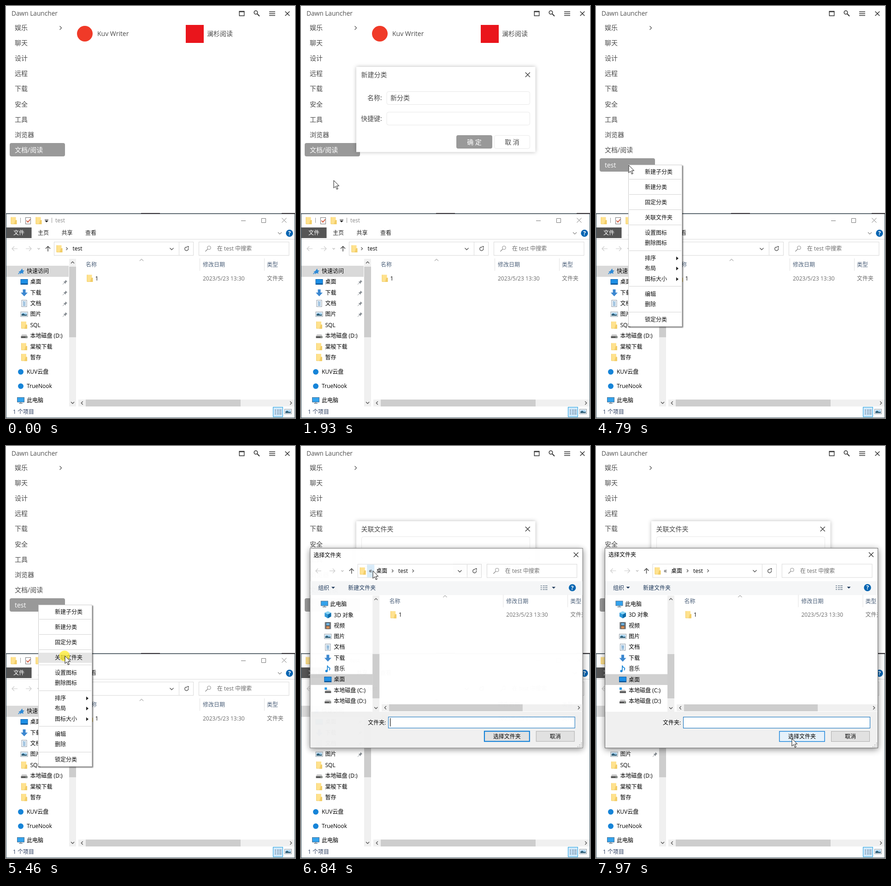
An HTML page that plays this animation: 627x893 px, repeating every 8 s.

```html
<!DOCTYPE html>
<html lang="zh-CN">
<head>
<meta charset="utf-8">
<title>Dawn Launcher</title>
<style>
  html, body { margin: 0; width: 100%; height: 100%; overflow: hidden; background: #fff; }
  svg { display: block; }
  text { font-family: "Open Sans", "Noto Sans CJK SC", "Noto Sans CJK", sans-serif; white-space: pre; }
  .modal { filter: drop-shadow(0 0 4px #0004); }
  .menu { filter: drop-shadow(2px 2px 1px #0008); }
  .window { filter: drop-shadow(0 3px 7px #0007); transform-origin: 315px 438px; }
</style>
</head>
<body>
<svg id="stage" width="100%" height="100%" viewBox="0 0 627 893"></svg>
<script>
const LOOP = 8000;
const stage = document.getElementById('stage');

// y is the vertical middle of the line of text
const text = (x, y, s, fill = '#000', size = 12, attrs = '') =>
  `<text x="${x}" y="${y + size * .37}" font-size="${size}" fill="${fill}" ${attrs}>${s}</text>`;
const label = (x, y, s, attrs = '') => text(x, y, s, '#4a4a4a', 14, attrs);
const middle = 'text-anchor="middle"';
const rect = (x, y, w, h, fill, attrs = '') =>
  `<rect x="${x}" y="${y}" width="${w}" height="${h}" fill="${fill}" ${attrs}/>`;
const box = (x, y, w, h, stroke, fill = '#fff', rx = 0) =>
  rect(x, y, w, h, fill, `stroke="${stroke}" rx="${rx}"`);
const line = (d, stroke = '#444', width = 1, fill = 'none') =>
  `<path d="${d}" fill="${fill}" stroke="${stroke}" stroke-width="${width}"/>`;
const shape = (d, fill) => `<path d="${d}" fill="${fill}"/>`;
const dot = (x, y, r, fill) => `<circle cx="${x}" cy="${y}" r="${r}" fill="${fill}"/>`;
const at = (x, y, s) => `<g transform="translate(${x} ${y})">${s}</g>`;
const group = (id, s, attrs = '') => `<g id="${id}" ${attrs}>${s}</g>`;

const cross = (x, y, r = 5, c = '#444', w = 1.5) =>
  line(`M${x - r} ${y - r}l${2 * r} ${2 * r}m0 ${-2 * r}l${-2 * r} ${2 * r}`, c, w);
const down = (x, y, r = 4, c = '#555', w = 1.4) => line(`M${x - r} ${y - r / 2}l${r} ${r}l${r} ${-r}`, c, w);
const up = (x, y, r = 3.5, c = '#555', w = 1.4) => line(`M${x - r} ${y + r / 2}l${r} ${-r}l${r} ${r}`, c, w);
const right = (x, y, r = 3, c = '#555', w = 1.3) => line(`M${x - r / 2} ${y - r}l${r} ${r}l${-r} ${r}`, c, w);
const left = (x, y, r = 3.5, c = '#555', w = 1.4) => line(`M${x + r / 2} ${y - r}l${-r} ${r}l${r} ${r}`, c, w);
const triangle = (x, y, c = '#222') => shape(`M${x - 4} ${y - 2}h8l-4 4z`, c);
const help = (x, y) => dot(x, y, 7.7, '#0063b1') + text(x, y, '?', '#fff', 12, middle + ' font-weight="700"');

// Small icons, each centred on its own origin
const icons = {
  folder: rect(-6.5, -7.5, 11, 15, '#ffe28e') + shape('M3-1h3.5v9h-6z', '#f2cd67') +
    line('M-6-7.5v15h12', '#efc85c', .8),
  desktop: box(-7.5, -5.5, 15, 11, '#0a5fa8', '#1d8fe6') + rect(-7, 3.5, 14, 2, '#0b4f8e'),
  download: shape('M-3-7h6v7h4.5l-7.5 8-7.5-8h4.5z', '#3b87d0'),
  doc: box(-5.5, -7, 11, 14, '#8796a5') + line('M-3-4h3m1 0h2M-3-1.3h6M-3 1.4h6M-3 4.1h6', '#3b82bd', 1.3),
  picture: box(-7.5, -5, 15, 10, '#8d99a3') + rect(-5.8, -3.3, 11.6, 6.6, '#a8d4f2') +
    shape('M-5.8 3.3v-3l4-2 4 3 3.6-1v3z', '#2d5d76'),
  disk: shape('M-5-3h10l2 4h-14z', '#c9c9c9') + rect(-7, 1, 14, 4, '#555') + rect(3, 2.4, 3, 1.2, '#d5e8d5'),
  system: rect(-7, -6, 5, 5, '#1996e6') + shape('M-4-1h9l2 3h-13z', '#c9c9c9') + rect(-6.5, 2, 13.5, 4, '#555'),
  pc: box(-7.5, -6.5, 15, 10, '#4a6f8e', '#33a3ee') + line('M-4 6.2h8M0 3.5v3', '#6d7f8e', 1.4),
  cube: shape('M0-7.5l7 3v8l-7 4-7-4v-8z', '#2d97d8') + shape('M0-1l7-3.5v8l-7 4z', '#0d6aa8') +
    shape('M0-7.5l7 3-7 3.5-7-3.5z', '#8bd6f5'),
  video: rect(-6.5, -7.5, 13, 15, '#3a3f45') + rect(-3.5, -6, 7, 5.5, '#6fb1dd') + rect(-3.5, 1, 7, 5.5, '#d78d55') +
    line('M-5-6.5v14M5-6.5v14', '#fff', 1.2).replace('/>', ' stroke-dasharray="1.5 1.5"/>'),
  music: line('M-1 5v-12q1 4 5 5.5q1 2-1 5', '#1e88d8', 1.8) + dot(-3, 5, 2.6, '#1e88d8'),
  cloud: dot(0, 0, 6, '#1684d8'),
  star: shape('M2-6l1.2 4 3.8.6-3 2.8.8 4.2-3.8-1.8-4 2.8.8-4-3.8-1.6 4-1.4z', '#2d89d6') + line('M-6.5 6l4-4', '#2d89d6', 1.4),
  pin: shape('M1-5l4 4-1.5.6-2 2 0 2.4-5-5 2.4 0 2-2z', '#868c92') + line('M-1.5 1.5l-3.5 3.5', '#868c92'),
  details: line('M-8-4h3m2 0h4m1 0h5M-8 0h3m2 0h4m1 0h5M-8 4h3m2 0h4m1 0h5', '#6c7f90', 1.5),
  magnifier: `<circle cx="2" cy="-2" r="3.8" fill="none" stroke="#888"/>` + line('M-1 1l-5 5', '#888', 1.3),
  refresh: line('M1.5-3.2a3.9 3.9 0 1 0 2.2 2', '#555', 1.4) + shape('M1-5.6h4v4z', '#555')
};
const icon = (name, x, y) => at(x, y, icons[name]);

const row = (x, y, name, s) => icon(name, x - 13, y) + text(x, y, s);
const vbar = (x, y, h, ty, th) => rect(x, y, 15, h, '#f0f0f0') + rect(x, ty, 15, th, '#cdcdcd') +
  up(x + 7.5, y + 8) + down(x + 7.5, y + h - 8, 3.5);
const hbar = (x, y, w, tx, tw) => rect(x, y, w, 15, '#f0f0f0') + rect(tx, y, tw, 15, '#cdcdcd') +
  left(x + 8, y + 7.5) + right(x + w - 8, y + 7.5, 3.5, '#555', 1.4);

const addressBar = (x, y, end) =>
  line(`M${x + 6} ${y}h-12m5-5l-5 5l5 5M${x + 24} ${y}h12m-5-5l5 5l-5 5`, '#ccc', 1.2) +
  down(x + 52, y, 2.5, '#bbb') +
  line(`M${x + 72} ${y + 6}v-11m-5 5l5-5l5 5`, '#555', 1.6) +
  box(x + 85.5, y - 14.5, end - x - 85.5, 29, '#d9d9d9') +
  line(`M${end - 31} ${y - 14}v28`, '#d9d9d9') +
  down(end - 47, y + .5) + icon('refresh', end - 15, y) +
  box(end + 12, y - 14.5, 195.5, 29, '#d9d9d9') +
  icon('magnifier', end + 32, y) + text(end + 51.5, y, '在 test 中搜索', '#6a6a6a');

const fileList = text(173, 561, '名称', '#4c607a') + up(294, 550.5, 4, '#777', 1) +
  line('M420.5 547v27M560.5 547v27', '#e2e2e2') +
  text(427, 561, '修改日期', '#4c607a') + text(566, 561, '类型', '#4c607a') +
  icon('folder', 182, 590) + text(193.5, 590.5, '1') +
  text(427, 590.5, '2023/5/23 13:30', '#6d6d6d') + text(566, 590.5, '文件夹', '#6d6d6d');

// Launcher
const categories = ['娱乐', '聊天', '设计', '远程', '下载', '安全', '工具', '浏览器', '文档/阅读', 'test'];
const categoryY = i => Math.round(47 + 33.1 * i);
const launcher = text(12, 16, 'Dawn Launcher', '#505050', 13.7) +
  line('M506.3 12.3h10.4v9h-10.4z', '#333', 1.4) + line('M505.6 12h11.8', '#333', 2.6) +
  `<circle cx="542" cy="14" r="3.7" fill="none" stroke="#333" stroke-width="1.6"/>` + line('M545 17l5 5', '#333', 2) +
  line('M571 12.5h13M571 16.5h13M571 20.5h13', '#333', 1.4) + cross(610.5, 16.5, 4.8, '#333') +
  right(118.5, 47.5, 4, '#555') +
  rect(8, 297, 120, 29, '#999', 'id="selected" rx="4"') +
  categories.map((s, i) => label(19, categoryY(i), s, `id="category${i}"`)).join('') +
  group('apps', dot(171, 60, 17, '#f03a28') + label(198, 60, 'Kuv Writer') +
    rect(390, 41, 39, 39, '#ea151c') + label(436, 60, '澜杉阅读'));

// Explorer window
const places = [['desktop', '桌面'], ['download', '下载'], ['doc', '文档'], ['picture', '图片'],
  ['folder', 'SQL'], ['disk', '本地磁盘 (D:)'], ['folder', '棠梭下载'], ['folder', '暂存']];
const explorer = box(.5, 450.5, 626, 442, '#465d69') + line('M0 450h627', '#48545c', 1.5) +
  line('M293 449.5h41M598 449.5h29', '#2a2024', 1.5) +
  icon('folder', 17, 465) + line('M31.5 459v11M99.5 459v11', '#999') +
  box(42.5, 458.5, 11, 14, '#777') + line('M44.5 465l3 3.5 5-6', '#d24726', 1.7) +
  icon('folder', 71, 465) + line('M84 463h8', '#222') + triangle(88, 467) + text(107, 465, 'test', '#888') +
  line('M510 465.5h10M554.5 460.5h9v9h-9z', '#777') + cross(603.5, 464.5, 5, '#777', 1) +
  rect(1, 480, 54.5, 23, '#555') + text(16, 492, '文件', '#fff') +
  ['主页', '共享', '查看'].map((s, i) => text(69 + 51.5 * i, 492, s, '#222')).join('') +
  line('M1 505.5h625', '#dadada') + down(594, 492.5, 4, '#888', 1.1) + help(615, 492.5) +
  addressBar(19, 526, 406.5) + icon('folder', 116, 526) + right(132, 526) + text(144.5, 526, 'test') +
  fileList +
  rect(1, 563, 135, 24, '#d9d9d9') + icon('star', 33, 575) + text(45, 575, '快速访问') +
  places.map(([name, s], i) => row(52.5, 598 + 23.35 * i, name, s) +
    (i < 4 ? icon('pin', 128, 598.5 + 23.35 * i) : '')).join('') +
  row(45, 793, 'cloud', 'KUV云盘') + row(45, 824, 'cloud', 'TrueNook') + row(45, 855, 'pc', '此电脑') +
  vbar(137, 548, 320, 565, 153) + hbar(157, 853, 469, 173, 336) +
  text(15, 880, '1 个项目', '#26395c') +
  box(579.5, 869.5, 21, 21, '#26a0da', '#cce8ff') + at(591, 880, icons.details) + icon('picture', 612, 879);

// Launcher dialogs
const field = (x, y, w, h) => box(x, y, w, h, '#e8e8e8', '#fff', 4);
const confirm = (x, y) => rect(x, y, 78, 29, '#999', 'rx="4"') +
  text(x + 39, y + 14.5, '确 定', '#fff', 14, middle + ' font-weight="500"');
const cancel = y => field(419.5, y + .5, 77, 28.5) + label(458, y + 14.5, '取 消', middle);
const modal = (y, h, title) => rect(120, y, 388.5, h, '#fff') + label(130.5, y + 17, title) + cross(491.8, y + 17);
const createDialog = modal(132, 184.5, '新建分类') +
  label(144, 199, '名称:') + field(186, 185.5, 310.5, 28) +
  label(130, 244, '快捷键:') + field(186, 230, 310.5, 28) +
  label(194, 199, '', 'id="name"') + rect(0, 190, 1, 18, '#000', 'id="caret"') + confirm(337, 280) + cancel(280);
const linkDialog = modal(163, 123, '关联文件夹') + field(131.5, 196.5, 365, 48) +
  field(131.5, 251.5, 28, 28) + field(165, 251.5, 28, 28) +
  line('M139 260.5h5l2 2h7v9h-14z', '#444', 1.5) +
  line('M174 261h10M177 260v-1.3h4v1.3M175.3 262v9.3h7.4v-9.3', '#444', 1.5) + confirm(329.5, 251) + cancel(251);

// Context menus
const createMenu = box(50.5, 365.5, 92, 29, '#ddd') + rect(51, 368, 91, 24, '#e5e5e5') +
  text(73, 380.5, '新建分类', '#111');
const menuItems = [['新建子分类', 360], ['新建分类', 393], ['固定分类', 426], ['关联文件夹', 459], ['设置图标', 492],
  ['删除图标', 514], ['排序', 547], ['布局', 569], ['图标大小', 592], ['编辑', 625], ['删除', 647], ['锁定分类', 680]];
const categoryMenu = box(70.5, 344.5, 116, 350, '#ccc') + rect(71, 0, 115, 22, '#e5e5e5', 'id="menuHover"') +
  [375, 408, 441, 474, 530, 607, 663].map(y => line(`M72 ${y + .5}h113`, '#d4d4d4')).join('') +
  menuItems.map(([s, y]) => text(106, y, s, '#111')).join('') +
  [547, 569, 592].map(y => shape(`M174 ${y - 4}l5 4-5 4z`, '#222')).join('');

// Folder picker
const drives = [['cube', '3D 对象'], ['video', '视频'], ['picture', '图片'], ['doc', '文档'], ['download', '下载'],
  ['music', '音乐'], ['desktop', '桌面'], ['system', '本地磁盘 (C:)'], ['disk', '本地磁盘 (D:)']];
const grip = [[8, 0], [4, 4], [8, 4], [0, 8], [4, 8], [8, 8]].map(([x, y]) => rect(600 + x, 643 + y, 2, 2, '#bbb')).join('');
const picker = box(19.5, 221.5, 592, 433, '#6b6b6b') +
  text(27, 236, '选择文件夹') + cross(597, 235.5, 5, '#222', 1.1) +
  addressBar(37.5, 270.5, 391.5) + icon('folder', 134, 270.5) + rect(143, 257, 16, 27.5, '#d8ebf9', 'id="crumbHover"') +
  text(147, 269.5, '«', '#333', 14) + text(163, 270.5, '桌面') + right(198.5, 270.5) + text(211, 270.5, 'test') + right(243, 270.5) +
  rect(20, 293, 591, 30, '#f5f6f7') + text(37, 307.5, '组织', '#1e395b') + triangle(69.5, 307, '#1e395b') +
  text(102, 307.5, '新建文件夹', '#1e395b') + at(528, 307, icons.details) + triangle(548.5, 307, '#1e395b') + help(589, 307) +
  `<svg width="611" height="893">${at(18.5, -224.7, fileList)}</svg>` +
  icon('pc', 50.5, 342.5) + text(63, 342.5, '此电脑') + rect(20, 494.5, 135, 23.5, '#d0d0d0') +
  drives.map(([name, s], i) => row(71, 366 + 23.35 * i, name, s)).join('') +
  vbar(155, 324, 252, 451, 96) + hbar(175, 560, 436, 191, 290) +
  rect(20, 576, 591, 78, '#f0f0f0') + text(145, 599.5, '文件夹:') +
  box(189.5, 587.5, 405, 24, '#0067b8') + rect(193, 590, 1.2, 18, '#111', 'id="pickerCaret"') +
  box(398, 618.5, 98, 22, '#0078d7', '#e1e1e1').replace('<rect', '<rect id="choose"') + text(447, 629.5, '选择文件夹', '#000', 12, middle) +
  box(510.5, 618.5, 83, 22, '#adadad', '#e1e1e1') + text(552, 629.5, '取消', '#000', 12, middle) + grip;

const arrow = line('M0 0v16.5l3.8-3.6 2.8 6.4 2.6-1.1-2.8-6.3h5.2z', '#111', 1, '#fff');
const hand = line('M-1 1.5q0-2 1.7-2t1.7 2v6q1-1.2 2.6 0 1.4-.9 2.6.5 2.2-.3 2.4 2v5.5q0 3-2 5v2h-8v-2l-5.5-8q-.6-2 1.2-2t3.3 2.6z', '#111', 1.1, '#fff') +
  line('M2.4 8v4M5 8.5v3.5M7.6 9v3', '#111', .9);

stage.innerHTML = launcher + explorer +
  group('createDialog', createDialog, 'class="modal"') + group('linkDialog', linkDialog, 'class="modal"') +
  group('createMenu', createMenu, 'class="menu"') + group('categoryMenu', categoryMenu, 'class="menu"') +
  group('picker', picker, 'class="window"') +
  group('cursor', `<circle id="click" r="11.5" cx="-1" fill="#ffed2e" opacity=".75"/>` + group('arrow', arrow) + group('hand', hand));

const $ = id => document.getElementById(id);
const show = (id, on) => $(id).setAttribute('display', on ? 'inline' : 'none');
const within = (t, a, b) => t >= a && t < b;

const cursorPath = [[210, 551, 861], [400, 468, 785], [580, 352, 672], [800, 155, 420], [920, 38, 353], [1010, 71, 378],
  [4220, 71, 378], [4440, 71, 345], [5040, 71, 345], [5340, 128, 455], [5500, 128, 455], [5680, 205, 320], [5820, 250, 304],
  [5880, 250, 303], [6340, 156, 270.5], [7050, 156, 270.5], [7520, 291, 495], [7900, 425, 634]];
const clicks = [[1260, 1370], [4470, 4590], [5380, 5480], [6440, 6580]];
const typing = [[1400, '新分类'], [2300, '新分'], [2440, '新'], [2550, ''], [2950, 't'], [3020, 'te'], [3190, 'tes'], [3260, 'test']];

function cursorAt(t) {
  const i = cursorPath.findIndex(p => p[0] > t);
  if (i < 1) return cursorPath.at(i).slice(1);
  const [t0, x0, y0] = cursorPath[i - 1], [t1, x1, y1] = cursorPath[i];
  const k = (t - t0) / (t1 - t0);
  return [x0 + (x1 - x0) * k, y0 + (y1 - y0) * k];
}

function render(t) {
  const [x, y] = cursorAt(t);
  const picking = t >= 6710;

  const selected = t < 4550 ? 8 : 9;
  $('selected').setAttribute('y', categoryY(selected) - 15);
  for (const i of [8, 9]) $('category' + i).setAttribute('fill', i === selected ? '#fff' : '#4a4a4a');
  show('category9', t >= 3520);
  show('apps', selected === 8);

  show('createMenu', within(t, 1040, 1380));
  show('createDialog', within(t, 1400, 3520));
  const [since, name] = typing.findLast(s => s[0] <= t) || typing[0];
  $('name').textContent = name;
  $('caret').setAttribute('x', Math.round(193.4 + (name ? $('name').getComputedTextLength() : 0)));
  show('caret', (t - since) % 1060 < 530);

  show('categoryMenu', within(t, 4720, 5480));
  const hovered = menuItems.find(item => Math.abs(item[1] - y) < 11);
  show('menuHover', hovered && within(t, 4720, 5480));
  if (hovered) $('menuHover').setAttribute('y', hovered[1] - 11);
  show('linkDialog', t >= 5520);

  show('picker', picking);
  const k = Math.min(1, Math.max(0, (t - 6710) / 180));
  const grown = 1 - (1 - k) ** 3;
  $('picker').style.opacity = grown;
  $('picker').style.transform = `scale(${.94 + .06 * grown})`;
  show('crumbHover', y < 285 && x < 165);
  show('pickerCaret', within(t, 6840, 7370));
  const overChoose = picking && y > 618;
  $('choose').setAttribute('fill', overChoose ? '#e5f1fb' : '#e1e1e1');
  $('choose').setAttribute('stroke-width', overChoose ? 1.3 : 2);

  show('cursor', t >= 210);
  $('cursor').setAttribute('transform', `translate(${x} ${y})`);
  const pointing = within(t, 5860, 6710) && x < 193 && y < 285;
  show('hand', pointing);
  show('arrow', !pointing);
  show('click', clicks.some(([a, b]) => within(t, a, b)));
}

const start = performance.now();
function tick() {
  render((performance.now() - start) % LOOP);
  requestAnimationFrame(tick);
}
tick();
</script>
</body>
</html>
```
